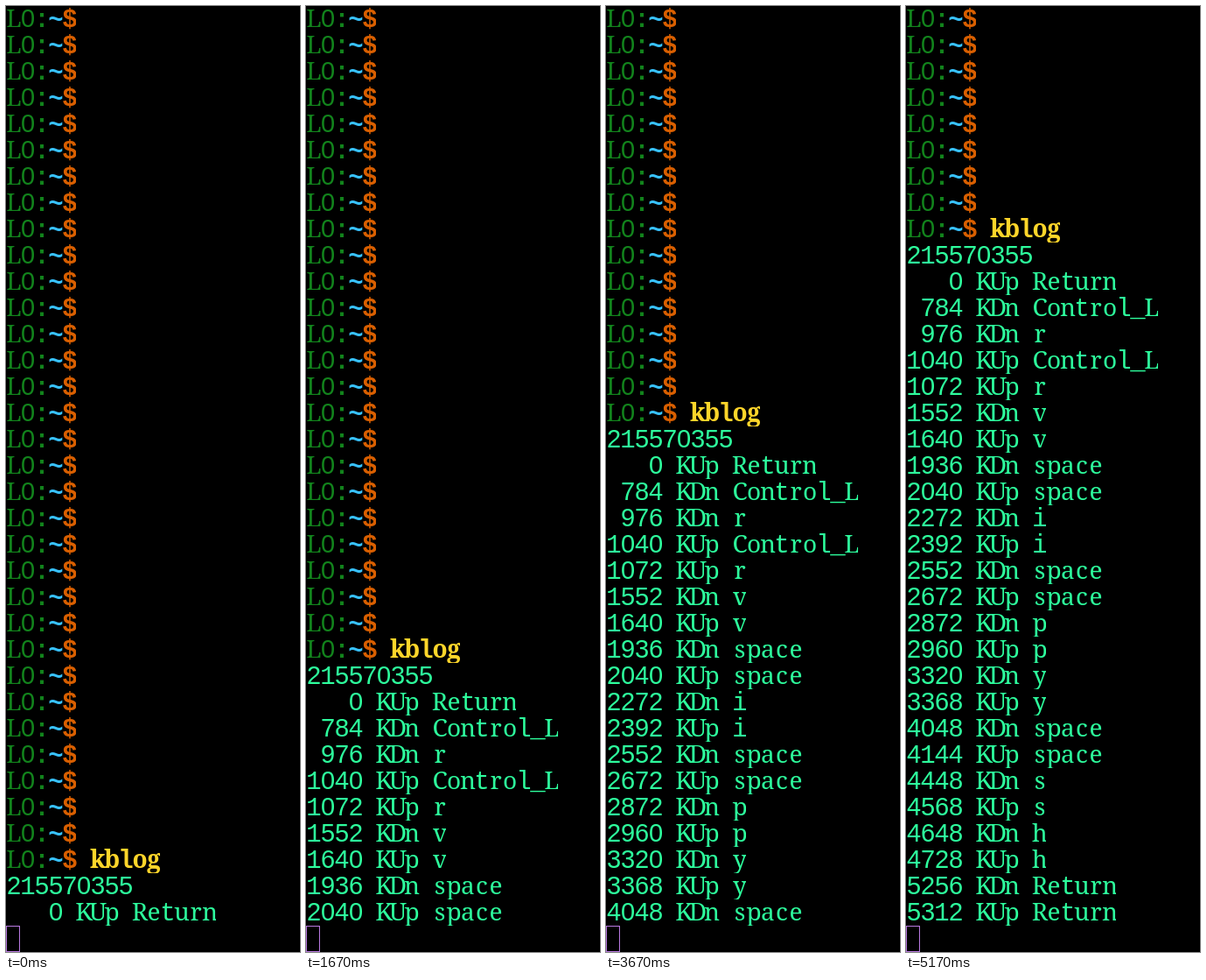
Recreate the animation shown at these times as an HTML page. Size 336x1080 px, loop 6 s.

```html
<!DOCTYPE html>
<html lang="en">
<head>
<meta charset="utf-8">
<title>Key log</title>
<style>
  html, body { margin: 0; width: 100%; height: 100%; overflow: hidden; background: #000; }
  #stage { display: block; width: 100%; height: 100%; }
  text { text-anchor: middle; }
  .serif { font: 28px "Noto Serif", serif; }
  .mono { font: 29px "Liberation Mono", monospace; }
  .sans { font: 29px "Liberation Sans", sans-serif; }
  .host { fill: #12831c; }
  .host .serif, .host .sans { font-weight: 300; }
  .colon { fill: #12831c; }
  .path { fill: #38c2ff; }
  .sign { fill: #d95f00; }
  .cmd { fill: #ffd62a; }
  .out { fill: #2dff9d; }
  .bold tspan { font-weight: 700; }
  #cursor { fill: none; stroke: #b878e0; }
</style>
</head>
<body>
<svg id="stage" viewBox="0 0 336 1080">
  <g id="rows"></g>
  <rect id="cursor" x="0.5" y="1050.5" width="15" height="29"/>
</svg>
<script>
  const LOOP = 6000, FPS = 6, CELL = 16, LINE = 30, BASE = 24;
  const GLYPH_MID = 9; // glyphs are a little wider than their cells
  const LOG_OFFSET = 455; // log clock at loop start
  const PROMPTS = 33;

  const events = `0 KUp Return
784 KDn Control_L
976 KDn r
1040 KUp Control_L
1072 KUp r
1552 KDn v
1640 KUp v
1936 KDn space
2040 KUp space
2272 KDn i
2392 KUp i
2552 KDn space
2672 KUp space
2872 KDn p
2960 KUp p
3320 KDn y
3368 KUp y
4048 KDn space
4144 KUp space
4448 KDn s
4568 KUp s
4648 KDn h
4728 KUp h
5256 KDn Return
5312 KUp Return`.split("\n").map(line => {
    const [time, ...rest] = line.split(" ");
    return { time: +time, text: [time.padStart(4), ...rest].join(" ") };
  });

  const face = c =>
    "itl_1:~$".includes(c) ? "mono" : /\d/.test(c) ? "sans" : "serif";

  // One run of text, each glyph placed in its terminal cell
  function run(text, style, col = 0) {
    const glyphs = [...text].map((c, i) => c === " " ? "" :
      `<tspan class="${face(c)}" x="${(col + i) * CELL + GLYPH_MID}">${c}</tspan>`);
    return `<text class="${style}" y="${BASE}">${glyphs.join("")}</text>`;
  }

  const row = (i, cols, body) =>
    `<svg y="${i * LINE}" width="${cols * CELL}" height="${LINE}">${body}</svg>`;

  const prompt = run("L0", "host") + run(":", "colon bold", 2) +
    run("~", "path bold", 3) + run("$", "sign bold", 4);

  const lines = [];
  for (let i = 1; i < PROMPTS; i++) lines.push([5, prompt]);
  lines.push([11, prompt + run("kblog", "cmd bold", 6)]);
  for (const text of ["215570355", ...events.map(e => e.text)])
    lines.push([text.length, run(text, "out")]);

  const rows = document.getElementById("rows");
  rows.innerHTML = lines.map(([cols, body], i) => row(i, cols, body)).join("");
  const logRows = [...rows.children].slice(PROMPTS + 1);

  let shown = -1;
  function draw() {
    const t = performance.now() % LOOP;
    const tick = Math.floor((t + 4) * FPS / 1000) % (LOOP * FPS / 1000);
    const clock = tick * 1000 / FPS + LOG_OFFSET;
    const count = events.filter(e => e.time <= clock).length;
    if (count !== shown) {
      shown = count;
      rows.setAttribute("transform", `translate(0 ${-LINE * (count - 1)})`);
      logRows.forEach((el, i) => el.setAttribute("visibility", i < count ? "visible" : "hidden"));
    }
    requestAnimationFrame(draw);
  }
  draw();
</script>
</body>
</html>
```
